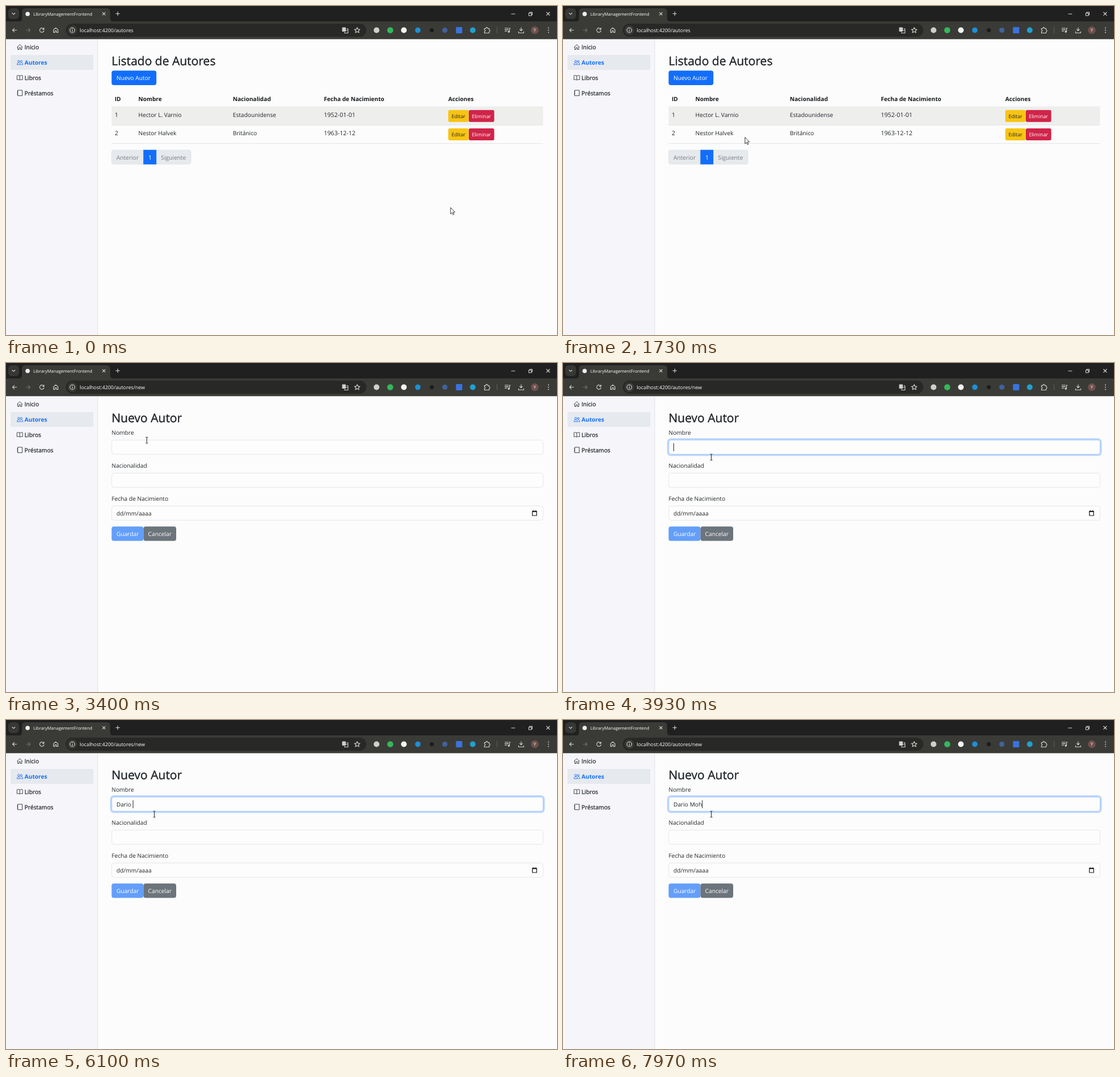
Write an HTML page that moves like this. It is 968 px wide and 578 px high and loops after 8 s.

```html
<!DOCTYPE html>
<html lang="es">
<head>
<meta charset="utf-8">
<title>Autores</title>
<style>
html, body { margin: 0; width: 100%; height: 100%; overflow: hidden; background: #fcfcfc; }
svg { display: block; width: 968px; height: 578px; }
text { font: 10.2px "Open Sans", "Noto Sans", sans-serif; white-space: pre; fill: #212529; text-rendering: geometricPrecision; }
.title { font-size: 21px; stroke: #212529; stroke-width: .4px; }
.nav { font-size: 10.25px; stroke: #212529; stroke-width: .25px; }
.bold { font-size: 10.15px; font-weight: 700; fill: #15181b; }
.num { font-size: 10.6px; }
.small { font-size: 8.8px; }
.white { fill: #fff; }
.mute { fill: #747b82; }
.line { fill: none; stroke: #d5d6d3; stroke-width: 1.1; stroke-linecap: round; stroke-linejoin: round; }
.thin { fill: none; stroke: #2b3035; stroke-width: .9; stroke-linejoin: round; }
</style>
</head>
<body>
<svg id="stage" viewBox="0 0 968 578"></svg>
<script>
const LOOP = 8000, PAGE_AT = 3050, HOVER_AT = 2085, FOCUS_AT = 3450;
const BLUE = '#126efa', BORDER = '#dee1e5';

const rect = (x, y, w, h, fill, r = 0, more = '') =>
  `<rect x="${x}" y="${y}" width="${w}" height="${h}" rx="${r}" fill="${fill}" ${more}/>`;
const text = (x, y, s, cls = '', more = '') => `<text x="${x}" y="${y}" class="${cls}" ${more}>${s}</text>`;
const dot = (x, y, r, fill) => `<circle cx="${x}" cy="${y}" r="${r}" fill="${fill}"/>`;
const line = (d, cls = 'line', more = '') => `<path d="${d}" class="${cls}" ${more}/>`;
const group = (id, body) => `<g id="${id}">${body}</g>`;

function tabStrip() {
  return rect(0, 0, 968, 28, '#1f201f') +
    rect(4, 4, 19, 19, '#373835', 6) + line('M11 12.5l2.4 2.4 2.4-2.4') +
    '<path d="M22 27.500q6 0 6-6V10q0-6 6-6H177q6 0 6 6V21.500q0 6 6 6Z" fill="#3a3b37"/>' +
    dot(38, 14, 3.8, '#f1f1f1') +
    text(48, 16.7, 'LibraryManagementFrontend', 'white', 'style="font-size:7.57px"') +
    line('M169.700 11.300l4.600 4.600m0-4.600l-4.600 4.600M193 13.500h6.600m-3.300-3.300v6.600') +
    line('M888 14h6M918.500 12.500h4.500v4.500h-4.500zM920 12.300v-1.300h4.500v4.500h-1.300M949.700 11l5.400 5.400m0-5.400l-5.400 5.400');
}

function toolbar() {
  const menu = [38.5, 42.5, 46.5].map(y => dot(953, y, .9, '#d5d6d3')).join('');
  const extensions = dot(651, 42.5, 5, '#cfd0ce') + dot(675, 42.5, 5.3, '#35b85c') +
    dot(699, 42.5, 5, '#f4f4f4') + dot(723.5, 42.5, 4.8, '#1e8fd6') + dot(748, 42.5, 3.6, '#1b1c1b') +
    dot(771, 42.5, 4.6, '#42629c') + rect(790.5, 37, 11, 11, '#3973df', 1) + dot(820, 42.5, 5, '#20a0cf');
  return rect(0, 27, 968, 31.3, '#3a3b37') + rect(105, 31, 528, 23, '#282927', 11.5) +
    line('M18.500 42.500h-7m3.200-3.200l-3.200 3.200 3.200 3.200') +
    line('M35.500 42.500h7m-3.200-3.200l3.200 3.200-3.200 3.200', 'line', 'opacity=".35"') +
    line('M66.300 40.500a3.800 3.800 0 1 0 .4 3M66.700 38.500v2.600h-2.600') +
    line('M83.500 41.700l3.900-3.400 3.900 3.400v4.800h-2.600v-3h-2.600v3h-2.600z') +
    dot(116.5, 42.5, 8.3, '#3a3b37') +
    '<circle cx="116.500" cy="42.500" r="4.200" class="line"/>' + line('M116.500 42.300v2.300m0-4.300v.1') +
    text(129.5, 45.7, '', 'white', 'id="url" style="font-size:8.85px"') +
    rect(590.5, 37.5, 6.5, 7.5, '#cfd0ce', 1) + line('M598.500 40h2.300v7.500h-6v-1.500M597.500 43h2.200') +
    line('M617 37.700l1.400 3.200 3.500.3-2.700 2.300.9 3.400-3.100-1.900-3.100 1.900.9-3.400-2.700-2.300 3.500-.3z') +
    extensions +
    line('M840.500 39.500h2.500c0-2.500 3.200-2.500 3.200 0h2.500v2.300c2 0 2 3.200 0 3.200v2.500h-8.200v-2.500c2 0 2-3 0-3z') +
    rect(862.300, 37, 1, 11, '#62635f') +
    line('M876.500 39h6m-6 2.600h6m-6 2.600h3.500M884.500 45v-6h1.500') + dot(883.3, 45.2, 1.6, '#d5d6d3') +
    line('M905 38v5.500m-2.500-2.300l2.500 2.500 2.500-2.500M900.500 45v2.300h9V45') +
    dot(929, 42.5, 6.7, '#72504c') + text(929, 45.3, 'Y', 'white', 'text-anchor="middle" style="font-size:7.800px"') + menu;
}

function sidebar() {
  return rect(0, 58.3, 161, 520, '#f6f6fa') + rect(160.5, 58.3, 1, 520, '#dfe1e6') +
    rect(8, 86, 145.5, 26.3, '#e6e9ee') +
    line('M19.300 72.500l4.900-4.700 4.900 4.700M20.700 71.500v5h2.300v-3.300h2.400v3.300h2.300v-5', 'thin') +
    text(32.5, 76, 'Inicio', 'nav') +
    line('M19.300 103c0-4.400 6-4.400 6 0zM26.500 103h3c0-3.300-2-3.800-3.300-3.200', 'thin', 'style="stroke:#126efa"') +
    '<circle cx="22.300" cy="97.300" r="1.800" class="thin" style="stroke:#126efa"/>' +
    '<circle cx="26.800" cy="97.300" r="1.500" class="thin" style="stroke:#126efa"/>' +
    text(32.5, 103, 'Autores', 'bold', 'style="fill:#126efa"') +
    line('M24.200 122.800c-1.500-1-3.400-1-4.900-.5v7.300c1.500-.5 3.400-.5 4.900.5 1.500-1 3.400-1 4.900-.5v-7.300c-1.500-.5-3.400-.5-4.900.5zv7', 'thin') +
    text(32.5, 129.8, 'Libros', 'nav') +
    line('M20.500 148h8v9.600h-8zM19.300 150.300h2m-2 2.500h2m-2 2.500h2', 'thin') +
    text(32.5, 156.7, 'Préstamos', 'nav');
}

function listPage() {
  const cols = [191, 232.5, 398.5, 558.5];
  const rows = [
    ['1', 'Hector L. Varnio', 'Estadounidense', '1952-01-01'],
    ['2', 'Nestor Halvek', 'Británico', '1963-12-12']
  ];
  const heads = ['ID', 'Nombre', 'Nacionalidad', 'Fecha de Nacimiento'];
  const body = rows.map((row, i) => {
    const y = 177 + i * 32.3;
    return (i ? '' : rect(185.5, y, 758, 32.3, '#eeeeed')) +
      rect(185.5, y + 31.8, 758, .8, BORDER) +
      row.map((s, c) => text(cols[c], y + 18, s, c % 3 ? '' : 'num')).join('') +
      rect(777, y + 5.7, 35.7, 21, '#f8c413', 2.7) + text(782.8, y + 19.8, 'Editar', 'small') +
      rect(813, y + 5.7, 44.7, 21, '#d02448', 2.7) + text(818.5, y + 19.8, 'Eliminar', 'small white');
  }).join('');
  return text(185.5, 104, 'Listado de Autores', 'title') +
    rect(185.5, 113.5, 78.7, 25.5, BLUE, 4, 'id="add"') + text(194, 130.4, 'Nuevo Autor', 'white') +
    heads.map((s, c) => text(cols[c], 167.2, s, 'bold')).join('') + text(777, 167.2, 'Acciones', 'bold') +
    rect(185.5, 176.6, 758, .8, BORDER) + body +
    rect(185.5, 253, 139.500, 25, '#e7eaed', 4, `stroke="${BORDER}" stroke-width=".7"`) +
    rect(241.3, 252.7, 22.9, 25.6, BLUE) + text(253, 269.7, '1', 'num white', 'text-anchor="middle"') +
    text(194, 269.7, 'Anterior', 'mute') + text(272.3, 269.7, 'Siguiente', 'mute');
}

function formPage() {
  const field = (y, label, id) => text(185.5, y - 9.6, label) +
    rect(185.8, y, 757.8, 25, '#fdfdfd', 4, `id="${id}" stroke="${BORDER}" stroke-width=".8"`);
  return text(185.5, 104, 'Nuevo Autor', 'title') +
    rect(184.2, 133.7, 761, 28.3, 'none', 5.3, 'id="ring" stroke="#126efa" stroke-opacity=".27" stroke-width="2.700"') +
    field(135.3, 'Nombre', 'name') + field(193.4, 'Nacionalidad', 'country') + field(251.2, 'Fecha de Nacimiento', 'birth') +
    text(194, 152, '', '', 'id="typed"') + rect(194, 141, 1, 14, '#212529', 0, 'id="caret"') +
    text(194, 267.6, 'dd/mm/aaaa') +
    line('M924.800 260.300h7.400v7.700h-7.400zM924.500 261.200h8M926.300 259v1.500m4.400-1.500v1.500', 'thin', 'style="stroke:#111;stroke-width:1.200"') +
    rect(185.5, 287.2, 56, 25.4, '#639ef9', 4) + text(194, 303.8, 'Guardar', 'white') +
    rect(241.5, 287.2, 57.5, 25.4, '#6c747c', 4) + text(249.6, 303.8, 'Cancelar', 'white');
}

const shape = (id, d) => `<path id="${id}" d="${d}" fill="#fff" stroke="#222" stroke-width=".9" stroke-linejoin="round"/>`;
const cursors =
  shape('arrow', 'M0 0V11.300L2.600 8.900 4.300 12.800 6.100 12 4.400 8.200H7.700Z') +
  shape('hand', 'M-1.200.8c0-1.600 2.300-1.600 2.300 0V5c.6-.7 1.900-.5 2 .4.700-.5 1.800-.2 1.900.7.800-.4 1.700 0 1.700.9V10.500c0 1.300-.8 2-.8 3.500H-.3c-.3-1.700-3-4-3.700-5.600-.4-1.100 1-1.700 1.700-.8l1.100 1.300Z') +
  '<path id="beam" d="M-2-5.300h1.500l.5.600.5-.6H2M0-4.700V4.700M-2 5.300h1.500l.5-.6.500.6H2" fill="none" stroke="#222" stroke-width="1"/>';

document.getElementById('stage').innerHTML = rect(0, 0, 968, 578, '#fcfcfc') + sidebar() + tabStrip() + toolbar() +
  group('list', listPage()) + group('form', formPage()) + group('cursor', cursors);

const el = {};
document.querySelectorAll('[id]').forEach(e => el[e.id] = e);
const set = (e, attrs) => { for (const k in attrs) e.setAttribute(k, attrs[k]); };
const show = (e, on) => e.setAttribute('visibility', on ? 'inherit' : 'hidden');
const clamp = v => Math.min(1, Math.max(0, v));
const mix = (a, b, k) => `rgb(${a.map((v, i) => Math.round(v + (b[i] - v) * k))})`;

// time, x, y of the pointer
const path = [
  [1100, 781, 354], [1300, 690, 335], [1500, 490, 290], [1640, 356, 254], [1730, 320, 231],
  [1900, 272, 172], [2100, 247.300, 135.500], [3400, 247.300, 135.500], [3600, 260.500, 165.500]
];
function pointer(t) {
  if (t <= path[0][0]) return path[0].slice(1);
  const i = path.findIndex(p => p[0] > t);
  if (i < 0) return path[path.length - 1].slice(1);
  const [a, b] = [path[i - 1], path[i]], k = (t - a[0]) / (b[0] - a[0]);
  return [a[1] + (b[1] - a[1]) * k, a[2] + (b[2] - a[2]) * k];
}

const NAME = 'Dario Moh';
const keys = [4900, 5150, 5350, 5550, 5720, 5950, 6700, 7050, 7700];

function draw(t) {
  const onForm = t >= PAGE_AT;
  show(el.list, !onForm);
  show(el.form, onForm);
  el.url.textContent = 'localhost:4200/autores' + (onForm ? '/new' : '');

  const [x, y] = pointer(t);
  const hand = !onForm && t >= HOVER_AT;
  set(el.cursor, { transform: `translate(${x} ${y})` });
  show(el.arrow, !onForm && !hand);
  show(el.hand, hand);
  show(el.beam, onForm);
  set(el.add, { fill: mix([18, 110, 250], [13, 92, 205], clamp((t - HOVER_AT) / 150)) });

  const focus = clamp((t - FOCUS_AT) / 150);
  set(el.ring, { opacity: focus });
  set(el.name, { stroke: mix([222, 225, 229], [134, 183, 254], focus) });

  const count = keys.filter(k => k <= t).length;
  el.typed.textContent = NAME.slice(0, count);
  const last = count ? keys[count - 1] : FOCUS_AT;
  const lit = t >= FOCUS_AT && (t - last) % 1000 < 500;
  show(el.caret, onForm && lit);
  set(el.caret, { x: 194 + (count ? el.typed.getComputedTextLength() : 0) });
}

const start = performance.now();
function tick() {
  draw((performance.now() - start) % LOOP);
  requestAnimationFrame(tick);
}
tick();
</script>
</body>
</html>
```
